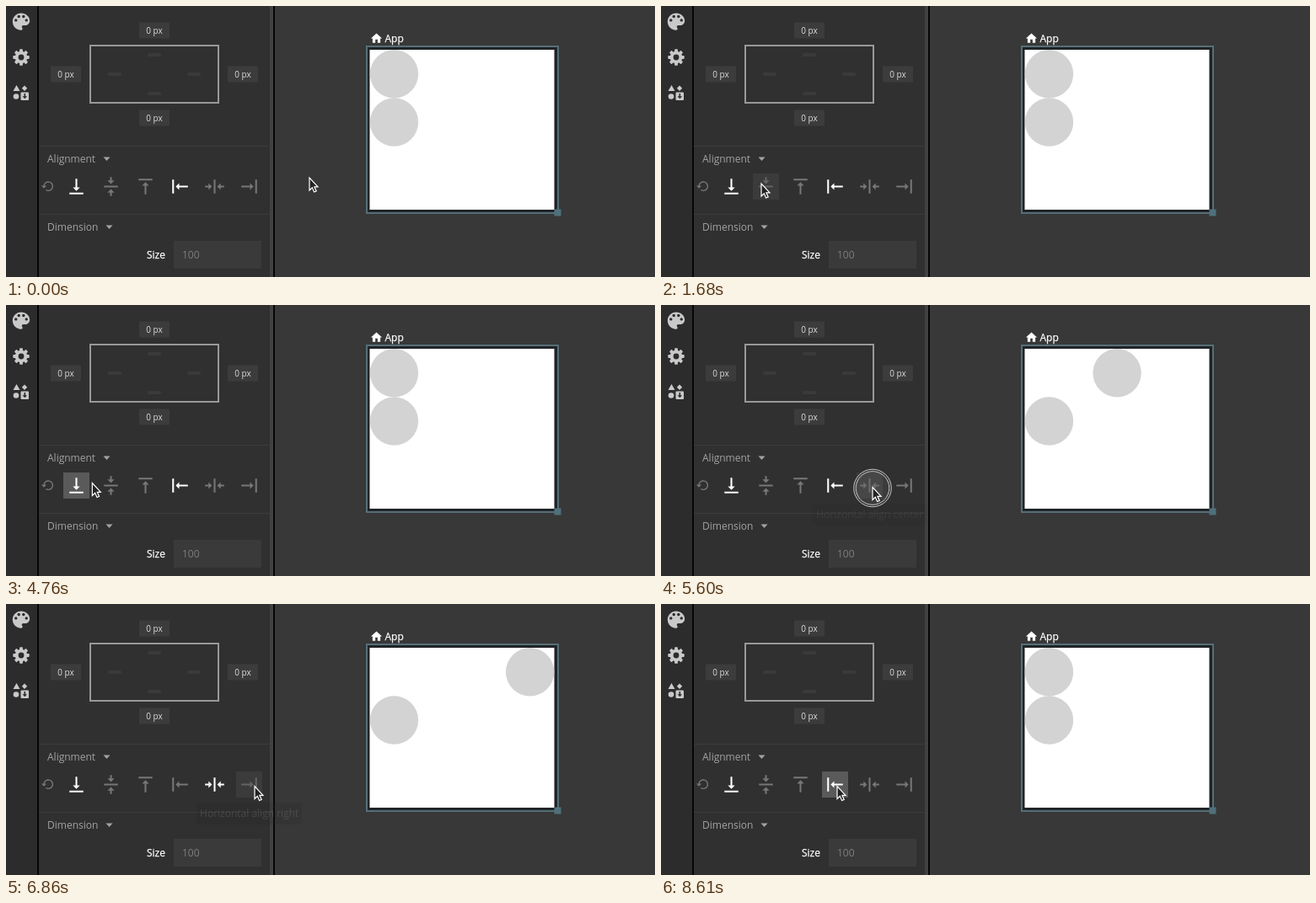
Recreate the animation shown at these times as an HTML page. Size 770x322 px, loop 9.31 s.

```html
<!DOCTYPE html>
<html lang="en">
<head>
<meta charset="utf-8">
<title>Alignment panel</title>
<style>
  html, body { margin: 0; width: 100%; height: 100%; overflow: hidden; background: #383838; }
  svg { display: block; width: 770px; height: 322px; }
  text { font: 12px "Open Sans", "Noto Sans", sans-serif; }
  .chip { font-size: 10px; text-anchor: middle; fill: #dcdcdc; }
  .head { fill: #a3a3a3; }
  .label { fill: #fff; stroke: #fff; stroke-width: .25; }
  #tip rect { fill: #222; }
  #tip text { fill: #c4c4c4; text-anchor: middle; }
</style>
</head>
<body>
<svg viewBox="0 0 770 322">
  <!-- panels -->
  <rect width="770" height="322" fill="#383838"/>
  <rect width="37" height="322" fill="#2c2c2c"/>
  <rect x="37" width="2" height="322" fill="#060606"/>
  <rect x="39" width="274" height="322" fill="#303030"/>
  <rect x="313" width="4" height="322" fill="#414141"/>
  <rect x="317" width="2" height="322" fill="#060606"/>
  <path d="M39 166.5H313M39 247.5H313" stroke="#3c3c3c"/>

  <!-- side rail -->
  <g fill="#c9c9c9">
    <path transform="translate(4.4 5) scale(1.13)" d="M12 3c-5 0-9 4-9 9s4 9 9 9c.8 0 1.5-.7 1.5-1.5 0-.4-.2-.7-.4-1-.2-.3-.4-.6-.4-1 0-.8.7-1.5 1.5-1.5H16c2.8 0 5-2.2 5-5 0-4.400-4-8-9-8z"/>
    <g id="wells" fill="#2c2c2c"></g>
    <g id="gear" transform="translate(18 61)"><circle r="7.300"/></g>
    <path d="M12.500 94l4 7h-8zM22 94.500l3.200 3.200-3.200 3.200-3.200-3.200z"/>
    <circle cx="12" cy="107.500" r="3.300"/>
    <rect x="17.500" y="102.500" width="9.500" height="9.500" rx="1"/>
    <path d="M21.500 104h1.600v3.200h2l-2.800 3-2.800-3h2z" fill="#2c2c2c"/>
  </g>

  <!-- spacing box -->
  <rect x="100" y="47" width="152" height="68" fill="none" stroke="#999" stroke-width="2"/>
  <g id="spacing"></g>

  <!-- headings and size field -->
  <g class="head">
    <text x="49" y="186">Alignment</text>
    <path d="M115.500 179.500h8l-4 4.500z"/>
    <text x="49" y="267">Dimension</text>
    <path d="M118.500 260.500h8l-4 4.500z"/>
  </g>
  <text class="label" x="167" y="300">Size</text>
  <rect x="199" y="279" width="104" height="33" fill="#3a3a3a"/>
  <text x="209" y="300" fill="#7d7d7d">100</text>

  <path d="M45 214a5.200 5.200 0 1 1 2.300 4.500" fill="none" stroke="#777" stroke-width="1.400"/>
  <path d="M42 213.500h6l-3 3.300z" fill="#777"/>
  <g id="buttons"></g>

  <!-- artboard -->
  <path transform="translate(431.600 30.500) scale(.66)" d="M10 20v-6h4v6h5v-8h3L12 3 2 12h3v8z" fill="#fff"/>
  <text class="label" x="449.500" y="43">App</text>
  <rect x="428" y="48" width="227" height="198" fill="#202426" stroke="#566f78" stroke-width="2"/>
  <rect x="431.500" y="52" width="219" height="190" fill="#fff"/>
  <rect x="650.500" y="241.500" width="8" height="8" fill="#4f717c"/>
  <circle id="ball" cy="80.700" r="28.700" fill="#d3d3d3"/>
  <circle cx="460.500" cy="138" r="28.700" fill="#d3d3d3"/>

  <g id="tip"><rect y="236" height="26" rx="2"/><text y="253"></text></g>

  <g id="ring" fill="none" stroke="#c4c4c4">
    <circle r="22.300" fill="#fff" fill-opacity=".06"/>
    <circle r="19.800"/>
  </g>
  <path id="cursor" d="M0 0V15l3.300-3.200 2.300 5.200 2.600-1.100-2.300-5.100H10z" fill="#222" stroke="#fff" stroke-width="1.200"/>
</svg>

<script>
const LOOP = 9310, STEP = 70;
const NS = 'http://www.w3.org/2000/svg';
const $ = id => document.getElementById(id);
const range = n => [...Array(n).keys()];
const clamp = p => Math.min(1, Math.max(0, p));

function set(el, attrs) {
  for (const k in attrs) el.setAttribute(k, attrs[k]);
  return el;
}
function add(parent, tag, attrs) {
  return parent.appendChild(set(document.createElementNS(NS, tag), attrs));
}

// palette wells sit on an arc, gear teeth on a circle
for (const i of range(4)) {
  const a = Math.PI * (1.07 + .287 * i);
  add($('wells'), 'circle', { cx: 18 + 6.4 * Math.cos(a), cy: 18.3 + 6.4 * Math.sin(a), r: 1.7 });
}
for (const i of range(8))
  add($('gear'), 'rect', { x: -1.9, y: -9.7, width: 3.8, height: 5, rx: .8, transform: `rotate(${45 * i})` });
add($('gear'), 'circle', { r: 3.4, fill: '#2c2c2c' });

// a chip outside and a dash inside each side of the spacing box
for (const i of range(4)) {
  const dx = Math.round(Math.cos(i * Math.PI / 2)), dy = Math.round(Math.sin(i * Math.PI / 2));
  const x = 176 + 105 * dx, y = 81 + 52 * dy, g = $('spacing');
  add(g, 'rect', { x: x - 18, y: y - 9.5, width: 36, height: 19, rx: 1, fill: '#3c3c3c' });
  add(g, 'text', { x, y: y + 3.7, class: 'chip' }).textContent = '0 px';
  add(g, 'rect', { x: 168 + 47 * dx, y: 79 + 23 * dy, width: 16, height: 4, rx: 1.5, fill: '#3a3a3a' });
}

// alignment buttons: three vertical, then three horizontal
const EDGE = 'M16 13h-3V3h-2v10H8l4 4 4-4zM4 19v2h16v-2z';
const MID = 'M8 19h3v4h2v-4h3l-4-4zM16 5h-3V1h-2v4H8l4 4zM4 11v2h16v-2z';
const buttonX = i => 83.5 + 41 * i;
const buttons = [0, 0, 180, 90, 90, -90].map((turn, i) => {
  const x = buttonX(i);
  return {
    back: add($('buttons'), 'rect', { x: x - 15.5, y: 199, width: 31, height: 31 }),
    icon: add($('buttons'), 'path', {
      d: i % 3 === 1 ? MID : EDGE,
      transform: `translate(${x} 214.5) rotate(${turn}) scale(1.03) translate(-12 -12)`
    })
  };
});

// the pointer goes to each button in turn and clicks it
const visits = [
  { button: 1, off: -5.5, leave: 630, arrive: 1680, click: 2170 },
  { button: 2, off: -3.5, leave: 2520, arrive: 2940, click: 3080 },
  { button: 0, off: 3.5, leave: 3430, arrive: 4060, click: 4130 },
  { button: 4, off: 3.5, leave: 4720, arrive: 5390, click: 5530, tip: 'Horizontal align center', width: 136 },
  { button: 5, off: 6.5, leave: 6580, arrive: 6790, click: 6720, tip: 'Horizontal align right', width: 125 },
  { button: 3, off: 2.5, leave: 7280, arrive: 7770, click: 7980 }
];
const BALL_LAG = 70, RING_TIME = 140, ICON_LAG = 210, TIP_TIME = 770;

function pointer(t) {
  let x = 360, y = 204;
  for (const v of visits) {
    const p = Math.sin(clamp((t - v.leave) / (v.arrive - v.leave)) * Math.PI / 2);
    x += (buttonX(v.button) + v.off - x) * p;
    y += ((v.button < 3 ? 211 : 216.5) - y) * p;
  }
  return [x, y];
}

// last button clicked in the group that starts at first
function chosen(first, t) {
  const done = visits.filter(v => v.button >= first && v.button < first + 3 && v.click <= t);
  return done.length ? done.pop().button : first;
}

function drawTip(t) {
  const v = visits.find(v => v.tip && t >= v.click && t < v.click + TIP_TIME);
  $('tip').style.opacity = v ? Math.min(t - v.click, 2.7 * (v.click + TIP_TIME - t)) / 1000 : 0;
  if (!v) return;
  const [box, label] = $('tip').children, x = buttonX(v.button);
  set(box, { x: x - v.width / 2, width: v.width });
  set(label, { x: x + .2 }).textContent = v.tip;
}

function draw(t) {
  const [x, y] = pointer(t);
  const [hoverX] = pointer(t - STEP); // hover trails the pointer by one step
  set($('cursor'), { transform: `translate(${x} ${y})` });
  set($('ring'), { transform: `translate(${x} ${y + 1})` });
  $('ring').style.display = visits.some(v => t >= v.click && t < v.click + RING_TIME) ? '' : 'none';
  set($('ball'), { cx: 460.5 + 80.6 * (chosen(3, t - BALL_LAG) - 3) });

  const active = [chosen(0, t - ICON_LAG), chosen(3, t - ICON_LAG)];
  buttons.forEach(({ back, icon }, i) => {
    const on = active.includes(i), hover = Math.abs(hoverX - buttonX(i)) < 15.5;
    set(back, { fill: !hover ? 'none' : on ? '#5a5a5a' : '#3b3b3b' });
    set(icon, { fill: on ? '#fff' : hover ? '#646464' : '#777' });
  });
  drawTip(t);
}

const start = performance.now();
function tick() {
  const t = (performance.now() - start) % LOOP;
  draw(Math.floor(t / STEP) * STEP);
  requestAnimationFrame(tick);
}
tick();
</script>
</body>
</html>
```
